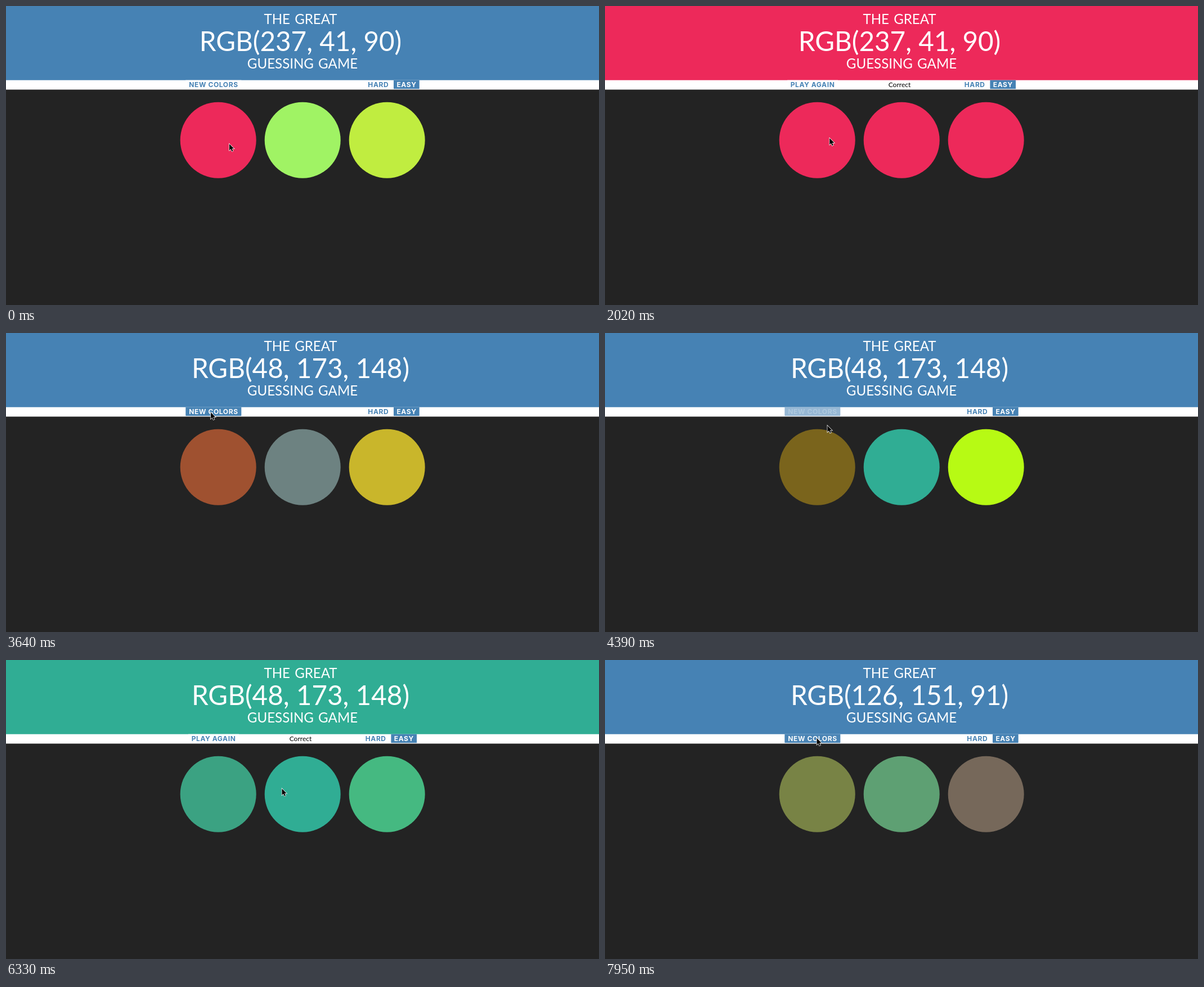
These frames come from a looping animation (1054 px wide and 531 px high, 8 s). An HTML page:

```html
<!DOCTYPE html>
<html lang="en">
<head>
<meta charset="utf-8">
<title>RGB guessing game</title>
<style>
  html, body { margin: 0; width: 100%; height: 100%; overflow: hidden; background: #232323; }
  svg { display: block; width: 1054px; height: 531px; }
  text { text-anchor: middle; }
  .title { font: 24.1px Lato, sans-serif; word-spacing: 2px; fill: #fff; }
  .code { font: 47.6px Lato, sans-serif; fill: #fff; }
  .button { font: 700 12px Inter, sans-serif; letter-spacing: .6px; fill: #4682b4; }
  .message { font: 12px Lato, sans-serif; }
</style>
</head>
<body>
<svg viewBox="0 0 1054 531">
  <rect width="1054" height="531" fill="#232323"/>
  <rect y="131" width="1054" height="17.5" fill="#fff"/>
  <rect id="header" width="1054" height="131.7"/>
  <text class="title" x="523.5" y="32">THE GREAT</text>
  <text class="code" id="code" x="523.5" y="80"></text>
  <text class="title" x="527" y="111">GUESSING GAME</text>
  <rect id="resetBox" y="131.7" height="15.5"/>
  <text class="button" id="reset" x="369" y="144"></text>
  <text class="message" id="message" x="523.5" y="144">Correct</text>
  <g id="modes">
    <text class="button" x="661.8" y="144">HARD</text>
    <rect x="689" y="131.7" width="45.7" height="15.5" fill="#4682b4"/>
    <text class="button" x="712" y="144" style="fill:#fff">EASY</text>
  </g>
  <g id="circles">
    <circle cx="377.2" cy="238.2" r="67.5"/>
    <circle cx="527.2" cy="238.2" r="67.5"/>
    <circle cx="677.2" cy="238.2" r="67.5"/>
  </g>
  <path id="cursor" d="M0 0V11.4L2.6 9 4.5 13.2 6.4 12.4 4.6 8.3H8.2Z" fill="#000" stroke="#fff" stroke-width="1.4" paint-order="stroke"/>
</svg>
<script>
const LOOP = 8000, FADE = 800;
const $ = id => document.getElementById(id);
const circles = [...$('circles').children];

// Screen refreshes: first, last, count
const bursts = [
  [500, 970, 4], [1270, 1270, 1], [2020, 2460, 4], [2760, 3790, 8], [3940, 4980, 8],
  [5130, 5130, 1], [5430, 5580, 2], [5880, 6330, 4], [6620, 6620, 1], [7060, 7950, 7]
];
const ticks = [0];
for (const [from, to, n] of bursts)
  for (let i = 0; i < n; i++)
    ticks.push(Math.round((from + (to - from) * i / Math.max(1, n - 1)) / 10) * 10);

const blue = [70, 130, 180], white = [255, 255, 255];
const red = [237, 41, 90], teal = [48, 173, 148], moss = [126, 151, 91];

// Game states: when shown, when the circles start to fade, circle colours
const states = [
  { at: 0, fade: -FADE, goal: red, colors: [red, [160, 243, 100], [192, 237, 64]] },
  { at: 500, fade: 510, goal: red, colors: [red, red, red], won: true },
  { at: 3350, fade: 3324, goal: teal, colors: [[122, 100, 28], teal, [183, 250, 20]] },
  { at: 5880, fade: 5890, goal: teal, colors: [teal, teal, teal], won: true },
  { at: 7800, fade: 7678, goal: moss, colors: [[171, 102, 14], moss, [167, 55, 49]] }
];

// Pointer path: time, x, y
const path = [
  [1900, 397, 245], [2170, 402, 222], [2460, 372, 150], [2760, 371, 149], [3050, 364, 141],
  [4080, 364, 141], [4980, 455, 209], [5130, 468, 215], [5430, 480, 222], [5580, 490.5, 228.5],
  [7000, 490.5, 228.5], [7360, 380, 144], [7650, 376.5, 139]
];

const clamp = v => Math.min(1, Math.max(0, v));
const mix = (a, b, p) => a + (b - a) * p;
const rgb = c => `rgb(${c.join(', ')})`;
const blend = (a, b, p) => rgb(a.map((v, i) => Math.round(mix(v, b[i], p))));

// CSS "ease" curve: cubic-bezier(.25, .1, .25, 1)
function ease(x) {
  if (x <= 0) return 0;
  if (x >= 1) return 1;
  const curve = (a, b, u) => 3 * a * u * (1 - u) ** 2 + 3 * b * u * u * (1 - u) + u ** 3;
  let lo = 0, hi = 1;
  for (let i = 0; i < 24; i++) {
    const mid = (lo + hi) / 2;
    if (curve(.25, .25, mid) < x) lo = mid; else hi = mid;
  }
  return curve(.1, 1, lo);
}
const fade = (t, start) => ease((t - start) / FADE);

function hover(t) {
  if (t < 4180) return fade(t, 2960);
  return t < 7310 ? 1 - fade(t, 4180) : fade(t, 7310);
}

function pointer(t) {
  const i = path.findIndex(p => p[0] > t);
  if (i < 0) return path[path.length - 1].slice(1);
  if (i === 0) return path[0].slice(1);
  const a = path[i - 1], b = path[i], p = clamp((t - a[0]) / (b[0] - a[0]));
  return [mix(a[1], b[1], p), mix(a[2], b[2], p)];
}

function render(t) {
  const n = states.findLastIndex(s => s.at <= t);
  const state = states[n], before = states[Math.max(0, n - 1)];
  const { goal, colors, won } = state;

  $('header').setAttribute('fill', rgb(won ? goal : blue));
  $('code').textContent = rgb(goal).toUpperCase();
  $('message').style.display = won ? '' : 'none';
  $('modes').setAttribute('transform', `translate(${won ? -4.6 : 0})`);

  const p = fade(t, state.fade);
  circles.forEach((c, i) => c.setAttribute('fill', blend(before.colors[i], colors[i], p)));

  const h = hover(t);
  $('reset').textContent = won ? 'PLAY AGAIN' : 'NEW COLORS';
  $('reset').style.fill = blend(blue, white, h);
  $('resetBox').setAttribute('x', won ? 324 : 319.3);
  $('resetBox').setAttribute('width', won ? 90 : 99);
  $('resetBox').setAttribute('fill', blend(white, blue, h));

  $('cursor').setAttribute('transform', `translate(${pointer(t)})`);
}

let shown = -1;
function frame() {
  const t = performance.now() % LOOP;
  const tick = ticks.findLast(v => v <= t);
  if (tick !== shown) render(shown = tick);
  requestAnimationFrame(frame);
}
frame();
</script>
</body>
</html>
```
